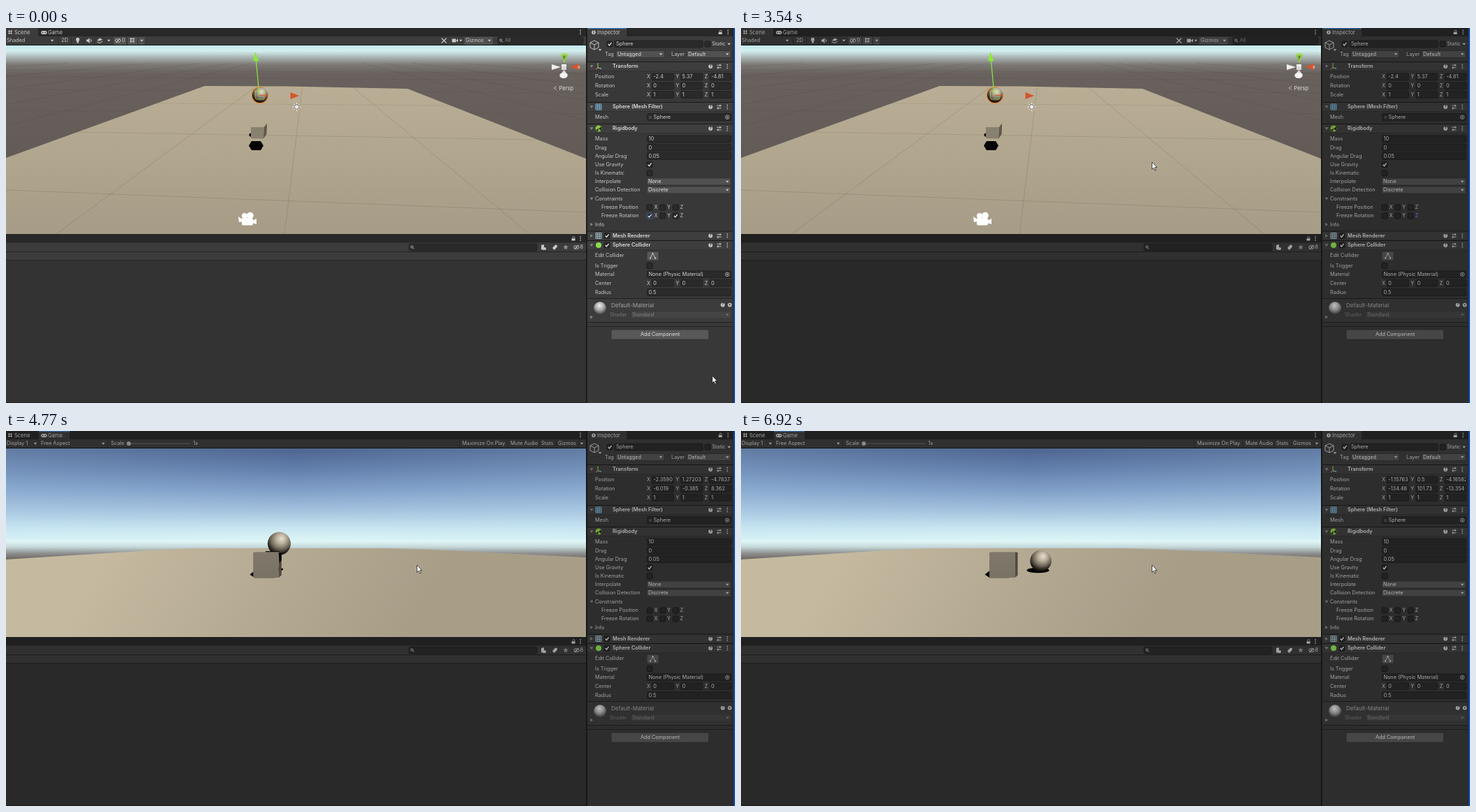
An HTML page with a canvas that plays this animation: 1042x537 px, repeating every 7 s.

```html
<!DOCTYPE html>
<html lang="en">
<head>
<meta charset="utf-8">
<title>Physics sandbox</title>
<style>
html, body { margin: 0; width: 100%; height: 100%; overflow: hidden; background: #333; }
canvas { display: block; }
</style>
</head>
<body>
<canvas id="stage" width="1042" height="537"></canvas>
<script>
const c = document.getElementById('stage').getContext('2d');
const LOOP = 7, STEP = 0.07692;
const PLAY = 2.23, GAME = 3.92, MOVE = 4.22, HIT = 4.769;
const FALL_START = HIT - Math.sqrt(4.09797 / 4.905);
const TEXT = '#c8c8c8', FIELD = '#2a2a2a', EDGE = '#191919', BLUE = '#3a79bb';

// ---------- helpers ----------
function rect(x, y, w, h, fill) { c.fillStyle = fill; c.fillRect(x, y, w, h); }

function box(x, y, w, h, fill, stroke, r = 1.5) {
  c.beginPath(); c.roundRect(x, y, w, h, r);
  c.fillStyle = fill; c.fill();
  if (stroke) { c.strokeStyle = stroke; c.lineWidth = 0.8; c.stroke(); }
}

function poly(points, fill) {
  c.beginPath();
  points.forEach(([x, y]) => c.lineTo(x, y));
  c.closePath(); c.fillStyle = fill; c.fill();
}

function line(points, color = TEXT, width = 1) {
  c.beginPath();
  points.forEach(([x, y]) => c.lineTo(x, y));
  c.strokeStyle = color; c.lineWidth = width; c.stroke();
}

function oval(x, y, rx, ry, fill) {
  c.beginPath(); c.ellipse(x, y, rx, ry, 0, 0, Math.PI * 2);
  c.fillStyle = fill; c.fill();
}

function ring(x, y, r, color = TEXT, width = 0.8) {
  c.beginPath(); c.arc(x, y, r, 0, Math.PI * 2);
  c.strokeStyle = color; c.lineWidth = width; c.stroke();
}

function text(s, x, y, { color = TEXT, size = 7.3, weight = 400, align = 'left' } = {}) {
  c.font = `${weight} ${size}px Inter, sans-serif`;
  c.textAlign = align; c.textBaseline = 'middle';
  c.fillStyle = color; c.fillText(s, x, y + 0.3);
}

function vertical(y0, y1, stops) {
  const g = c.createLinearGradient(0, y0, 0, y1);
  stops.forEach(([y, color]) => g.addColorStop((y - y0) / (y1 - y0), color));
  return g;
}

function ball(x, y, r, lift) {
  const g = c.createRadialGradient(x + r * .22, y - r * .45 - lift, 0, x + r * .1, y - r * .35 - lift, r * 1.4);
  g.addColorStop(0, '#e6dfd0'); g.addColorStop(.3, '#bab09c');
  g.addColorStop(.6, '#746c5d'); g.addColorStop(.85, '#221f1a'); g.addColorStop(1, '#050505');
  oval(x, y, r, r, g);
}

// Piecewise linear track: rows of [time, ...values]
function track(rows, t) {
  if (t <= rows[0][0]) return rows[0].slice(1);
  for (let i = 1; i < rows.length; i++) {
    const a = rows[i - 1], b = rows[i];
    if (t <= b[0]) return b.slice(1).map((v, j) => a[j + 1] + (v - a[j + 1]) * (t - a[0]) / (b[0] - a[0]));
  }
  return rows[rows.length - 1].slice(1);
}

// ---------- small interface parts ----------
const caret = (x, y, color = TEXT) => poly([[x - 2.3, y - 1.2], [x + 2.3, y - 1.2], [x, y + 1.5]], color);

function fold(x, y, open) {
  poly(open ? [[x - 2.5, y - 1.8], [x + 2.5, y - 1.8], [x, y + 2]]
            : [[x - 1.8, y - 2.5], [x + 2, y], [x - 1.8, y + 2.5]], '#858585');
}

function dots(x, y) { for (let i = -1; i < 2; i++) oval(x, y + i * 2.6, .8, .8, TEXT); }

function lock(x, y) {
  rect(x - 2.5, y - .3, 5, 3.3, TEXT);
  c.beginPath(); c.arc(x + .4, y - 1, 1.7, Math.PI, 0);
  c.strokeStyle = TEXT; c.lineWidth = .8; c.stroke();
}

function check(x, y, on, focus) {
  box(x - 4, y - 4, 8, 8, FIELD, focus ? BLUE : '#171717');
  if (on) line([[x - 2.3, y], [x - .6, y + 2], [x + 2.6, y - 2.2]], '#e0e0e0', 1.3);
}

function field(x, y, w, s) {
  box(x, y - 5, w, 10, FIELD, '#202020');
  c.save(); c.beginPath(); c.rect(x, y - 5, w - 1, 10); c.clip();
  text(s, x + 2, y, { color: '#d2d2d2' });
  c.restore();
}

function dropdown(x, y, w, s, dim) {
  box(x, y - 5, w, 10, dim ? '#444' : '#515151', dim ? '#3a3a3a' : '#303030');
  text(s, x + 2, y, { color: dim ? '#858585' : '#e0e0e0' });
  caret(x + w - 5, y, dim ? '#777' : TEXT);
}

function search(x, y, w) {
  box(x, y - 5, w, 10, FIELD, '#202020', 2);
  ring(x + 4.2, y - .6, 1.6); line([[x + 5.4, y + .6], [x + 7, y + 2.3]]);
}

function eye(x, y) {
  c.beginPath(); c.ellipse(x, y, 3.8, 2.4, 0, 0, 7);
  c.strokeStyle = TEXT; c.lineWidth = .9; c.stroke();
  oval(x, y, 1.1, 1.1, TEXT); line([[x - 3, y + 3], [x + 3, y - 3]]);
}

function gridIcon(x, y, color) {
  for (let i = -4; i <= 4; i += 2.66) {
    line([[x + i, y - 4], [x + i, y + 4]], color, .9);
    line([[x - 4, y + i], [x + 4, y + i]], color, .9);
  }
}

function help(x, y) {
  oval(x, y, 2.9, 2.9, TEXT);
  text('?', x, y, { size: 5.5, weight: 700, color: '#333', align: 'center' });
}

function header(y, title, open, toggled) {
  rect(831, y - 6.5, 208, 13, '#3e3e3e');
  rect(831, y - 7, 208, 1, '#1c1c1c');
  rect(831, y + 6, 208, .8, '#303030');
  fold(837, y, open);
  if (toggled) check(859, y, true);
  text(title, 867, y, { weight: 600, color: '#dcdcdc' });
  help(1007, y);
  for (const [dy, k] of [[-1.8, 1], [1.8, -1]]) {
    line([[1016, y + dy], [1022.5, y + dy]], TEXT, .9);
    rect(1018.6 + k * 1.5, y + dy - 1.5, 1.2, 3, TEXT);
  }
  dots(1031, y);
}

function vector(label, y, values) {
  text(label, 842, y);
  ['X', 'Y', 'Z'].forEach((axis, i) => {
    const x = 916 + i * 41.3;
    text(axis, x, y);
    field(x + 7.3, y, 31, values[i]);
  });
}

function axes(label, y, on, focusX, focusZ) {
  text(label, 851, y);
  ['X', 'Y', 'Z'].forEach((axis, i) => {
    const x = 920 + i * 18.6;
    check(x, y, on[i], i === 0 && focusX);
    text(axis, x + 6.4, y, { color: i === 2 && focusZ ? '#5b98e8' : TEXT });
  });
}

// ---------- panels ----------
function tabs(game) {
  rect(0, 0, 829, 12, '#282828');
  rect(game ? 47 : 0, 0, game ? 44 : 46, 12, '#3c3c3c');
  if (game) rect(47, 0, 44, 1.3, BLUE);
  for (const d of [-1.5, 1.5]) {
    line([[3, 6 + d], [9, 6 + d]], TEXT, .9);
    line([[6 + d, 3], [6 + d, 9]], TEXT, .9);
  }
  text('Scene', 12, 6.3, { size: 7.5 });
  box(50, 4, 8.5, 5, TEXT, null, 2.5);
  oval(52.4, 6.4, .9, .9, '#333'); oval(56, 6.4, .9, .9, '#333');
  text('Game', 60, 6.3, { size: 7.5 });
  dots(821, 6);
  rect(0, 12, 829, 12.5, '#3c3c3c');
  rect(0, 24, 829, 1, EDGE);
}

function sceneBar() {
  text('Shaded', 1, 18); caret(66, 18);
  for (const x of [74, 93, 110, 126]) rect(x, 13, 1, 11, '#303030');
  text('2D', 79, 18);
  oval(102.5, 16.5, 2.5, 2.7, TEXT); rect(101.3, 19, 2.5, 2.5, TEXT);
  poly([[115, 16.5], [117, 16.5], [119.5, 14], [119.5, 22], [117, 19.5], [115, 19.5]], TEXT);
  line([[121, 16], [122, 18], [121, 20]]);
  poly([[130, 18], [134, 14.5], [138, 16.5], [134, 18.5]], TEXT);
  line([[130, 20], [134, 21.5], [138, 19]]); caret(147, 18);
  rect(154, 13, 18, 11, '#515151'); eye(160, 18); text('0', 165.5, 18);
  rect(174, 13, 24, 11, '#515151'); rect(188, 13, 1, 11, '#303030');
  line([[177, 15.5], [184, 15.5]]); line([[177, 19], [184, 19]]);
  line([[178.5, 14], [178.5, 21.5]]); line([[182, 14], [182, 21.5]]); caret(194, 18);
  line([[622.5, 14.5], [629.5, 21.5]], TEXT, 1.3); line([[629.5, 14.5], [622.5, 21.5]], TEXT, 1.3);
  rect(637.5, 15.5, 5.5, 5, TEXT); poly([[643, 18], [646, 15.5], [646, 20.5]], TEXT); caret(650, 18);
  rect(655, 13, 41, 11, '#515151'); text('Gizmos', 657, 18); caret(691, 18);
  search(703, 18, 122); text('All', 713, 18, { color: '#858585' });
}

function gameBar() {
  text('Display 1', 1, 18); caret(42, 18);
  text('Free Aspect', 50, 18); caret(139, 18);
  text('Scale', 150, 18);
  rect(173, 17.5, 90, 1, '#666'); oval(175.5, 18, 3, 3, '#aaa');
  text('1x', 267.5, 18);
  text('Maximize On Play', 652, 18); text('Mute Audio', 721, 18);
  text('Stats', 765, 18); text('Gizmos', 789, 18); caret(823, 18);
  for (const x of [46, 145, 648, 717, 762, 786, 818]) rect(x, 13, 1, 11, '#303030');
}

function lowerPanel() {
  rect(0, 295, 829, 242, '#333');
  rect(0, 295, 829, 12.5, '#282828');
  rect(0, 307.5, 829, 25, '#3c3c3c');
  rect(0, 320, 829, 1, '#242424'); rect(0, 332, 829, 1, '#242424');
  lock(811, 301.5); dots(821, 301.5);
  search(576, 314, 183);
  poly([[765, 311], [769, 310], [769, 318], [765, 317]], TEXT); oval(770, 316, 2, 2, TEXT);
  poly([[781, 315], [785, 310.5], [788, 311], [787.5, 314], [783.5, 318]], TEXT);
  poly(Array.from({ length: 10 }, (_, i) => {
    const a = i * Math.PI / 5 - Math.PI / 2, r = i % 2 ? 1.7 : 4;
    return [800 + r * Math.cos(a), 314 + r * Math.sin(a)];
  }), '#929292');
  eye(815.5, 314); text('8', 820.5, 314);
  rect(0, 536, 829, 1, '#222');
}

function inspector(t) {
  const xOff = t >= .98, zOff = t >= 1.45;
  rect(829, 0, 213, 537, '#383838');
  rect(829, 0, 1.7, 537, EDGE);
  rect(831, 0, 208, 12, '#282828');
  rect(831, 0, 56, 12, '#3c3c3c');
  if (t < GAME) rect(831, 0, 56, 1.3, BLUE);
  oval(840, 6.2, 2.8, 2.8, TEXT); rect(839.5, 4.5, 1, 3.5, '#333');
  text('Inspector', 845, 6.3, { size: 7.4 });
  lock(1021, 6); dots(1032, 6);

  rect(831, 12, 208, 36, '#3c3c3c');
  line([[841, 18], [847, 21], [847, 28], [841, 31], [835, 28], [835, 21], [841, 18]], '#d0d0d0', .9);
  line([[835, 21], [841, 24], [847, 21]], '#d0d0d0', .9); line([[841, 24], [841, 31]], '#d0d0d0', .9);
  caret(849, 31.5);
  check(863, 23, true); field(870, 23, 126, 'Sphere');
  check(1003, 23, false); text('Static', 1009, 23); caret(1033.5, 23);
  text('Tag', 856, 37.5); dropdown(872, 37.5, 69, 'Untagged');
  text('Layer', 951, 37.5); dropdown(973, 37.5, 63, 'Default');

  header(55, 'Transform', true);
  line([[846, 50], [846, 57], [851, 58]], '#8bc83f', 1.1);
  line([[846, 57], [843, 59]], '#e0633a', 1.3); line([[846, 57], [851, 58]], '#6fb5e8', 1.1);
  const pose = readout(t);
  vector('Position', 70, pose.position);
  vector('Rotation', 83, pose.rotation);
  vector('Scale', 95.5, ['1', '1', '1']);

  header(113, 'Sphere (Mesh Filter)', true); gridIcon(847, 113, '#7fc0e8');
  text('Mesh', 842, 127.7); field(916.5, 127.7, 120, '');
  rect(919, 126, 4, 4, '#484848'); text('Sphere', 925.5, 127.7, { color: '#d2d2d2' });
  ring(1031, 127.7, 2.7); oval(1031, 127.7, 1, 1, TEXT);

  header(144, 'Rigidbody', true);
  oval(847, 144, 4.5, 4.5, '#8bc83f');
  poly([[847, 144], [851, 141.5], [851, 147]], '#222'); poly([[847, 144], [843, 146], [846, 148.3]], '#222');
  [['Mass', '10'], ['Drag', '0'], ['Angular Drag', '0.05']].forEach(([label, v], i) => {
    const y = 159 + i * 12.2;
    text(label, 842, y); field(916.5, y, 120, v);
  });
  text('Use Gravity', 842, 195.6); check(920, 195.6, true);
  text('Is Kinematic', 842, 207.8); check(920, 207.8, false);
  text('Interpolate', 842, 220); dropdown(916, 220, 120, 'None');
  text('Collision Detection', 842, 232); dropdown(916, 232, 120, 'Discrete');
  fold(837, 244.5, true); text('Constraints', 842, 244.5);
  axes('Freeze Position', 257, [0, 0, 0]);
  axes('Freeze Rotation', 269, [!xOff, false, !zOff], !zOff, zOff && t < GAME);
  fold(837, 281.3, false); text('Info', 842, 281.3);

  header(297.5, 'Mesh Renderer', false, true); gridIcon(847, 297.5, '#a8c4d4');
  header(311, 'Sphere Collider', true, true); oval(847, 311, 4, 4, '#8bdc4f');
  text('Edit Collider', 842, 326);
  box(916, 320, 17, 13, '#585858', '#303030');
  line([[921, 329.5], [924.5, 323], [928, 329.5]], TEXT, .8);
  for (const [x, y] of [[921, 329.5], [924.5, 323], [928, 329.5]]) rect(x - 1, y - 1, 2, 2, TEXT);
  text('Is Trigger', 842, 340.5); check(920, 340.5, false);
  text('Material', 842, 352.8); field(916.5, 352.8, 120, 'None (Physic Material)');
  ring(1031, 352.8, 2.7); oval(1031, 352.8, 1, 1, TEXT);
  vector('Center', 365.3, ['0', '0', '0']);
  text('Radius', 842, 378.5); field(916.5, 378.5, 120, '0.5');

  rect(831, 387, 208, 34, '#3c3c3c'); rect(831, 387, 208, 1, '#222');
  const g = c.createRadialGradient(848, 397, 0, 849, 399, 12);
  g.addColorStop(0, '#f0f0f0'); g.addColorStop(.5, '#aaa'); g.addColorStop(1, '#333');
  oval(849, 401, 9, 9, g);
  text('Default-Material', 865, 397, { size: 8, color: '#a4a4a4' });
  text('Shader', 863, 411, { color: '#747474' }); dropdown(893, 410.7, 143, 'Standard', true);
  fold(837, 414, false); help(1024.5, 396.5);
  ring(1034.5, 396.5, 2, TEXT, 1.7);
  rect(831, 421, 208, 1, '#222'); rect(831, 427, 208, 1, '#242424');
  box(865, 432, 139.5, 14, '#585858', '#303030');
  text('Add Component', 935, 439, { align: 'center', color: '#e4e4e4' });
}

// ---------- motion ----------
function height(t) {
  if (t < MOVE) return 5.37;
  if (t <= HIT) return 5.37 - 4.905 * (t - FALL_START) ** 2;
  const u = t - HIT;
  return u > .8565 ? .5 : 1.27203 + 3.3 * u - 4.905 * u * u;
}

function readout(t) {
  const [x, z] = track([[4.15, -2.4, -4.81], [HIT, -2.35904, -4.78374], [5.461, -1.8183, -4.44604], [6.92, -1.15763, -4.16582]], t);
  const turn = track([[4.6, 0, 0, 0], [HIT, -6.017, -.381, 8.355], [5.461, -39.254, -70.555, 133.324], [6.92, -134.46, 101.73, -13.354]], t);
  const y = height(t - Math.max(0, Math.min(.1835, t - HIT)));
  return {
    position: [x, y, z].map(v => String(+v.toFixed(5))),
    rotation: turn.map(v => String(+v.toFixed(3)))
  };
}

// ---------- views ----------
function clipView(draw) {
  c.save(); c.beginPath(); c.rect(0, 25, 829, 270); c.clip(); draw(); c.restore();
}

function sceneView() {
  rect(0, 25, 829, 270, vertical(25, 295, [[25, '#c4eaef'], [33, '#d3eeee'], [42, '#a9b4b3'], [53, '#7b7773'], [66, '#69615d'], [295, '#5d5550']]));
  const ray = (slope, color, from = 50) => line([[430 + slope * (from - 30), from], [430 + slope * 265, 295]], color, .8);
  for (const s of [3.9, 5.4, 7.5, 11, 17]) { ray(s, 'rgba(0,0,0,.1)'); ray(-s, 'rgba(0,0,0,.1)'); }
  for (const y of [60, 70, 88, 118]) line([[0, y], [829, y + 5]], 'rgba(0,0,0,.08)', .8);
  poly([[284, 83], [400, 83.5], [574, 87], [829, 187], [829, 295], [0, 295], [0, 186]],
    vertical(83, 295, [[83, '#b9ae95'], [180, '#b1a68e'], [295, '#a69c87']]));
  for (const s of [-1.35, -.12, 1.2]) ray(s, 'rgba(60,50,35,.2)', 85);
  line([[215, 108], [634, 111]], 'rgba(60,50,35,.13)', .8);
  line([[100, 149], [760, 160]], 'rgba(60,50,35,.16)', .8);
  line([[0, 232], [829, 264]], 'rgba(60,50,35,.2)', .8);

  poly([[347, 168.5], [351, 162], [364, 162], [368, 168.5], [364, 175], [351, 175]], '#050505');
  oval(350.5, 153, 3, 2.6, '#050505');
  poly([[350, 142], [369, 142], [368, 158.5], [350, 158]], '#89816f');
  poly([[369, 142], [373, 136.5], [372.5, 152], [368, 158.5]], '#5e574a');

  oval(363, 96, 12, 12, '#f47a20');
  ball(363, 96, 11, 0);
  line([[362, 96], [357.5, 47]], '#8be93c', 1.2);
  poly([[353, 47], [361.5, 47.5], [356.5, 34]], '#8be93c');
  line([[356, 90], [369, 90], [369, 102], [357, 102], [356, 90]], 'rgba(190,220,90,.75)', .9);
  line([[362, 96], [374, 97]], '#d4552b', 1);
  poly([[366, 86], [375, 85], [374, 94]], 'rgba(150,200,235,.35)');
  poly([[406.5, 92], [419, 97], [406.5, 102]], '#d4552b');

  for (let i = 0; i < 8; i++) {
    const a = i * Math.PI / 4, x = Math.cos(a), y = Math.sin(a);
    line([[415.5 + 4.2 * x, 113 + 4.2 * y], [415.5 + 6 * x, 113 + 6 * y]], '#fff', 1);
  }
  oval(415.5, 113, 3, 3, '#eee'); ring(415.5, 113, 3, '#777', .7);

  oval(341, 269, 4, 4, '#fff'); oval(349, 268.5, 4.8, 4.8, '#fff');
  box(337, 272, 16, 10.5, '#fff', null, 2);
  poly([[332, 270], [338, 274], [338, 277], [333, 278]], '#fff');
  poly([[352, 276], [358, 273], [358, 281], [352, 279]], '#fff');

  poly([[780, 52], [793, 56], [780, 60]], '#eef0f0');
  poly([[819, 51], [806, 55.5], [819, 60]], '#d4552b');
  poly([[793, 38], [803, 38], [798, 51]], '#8bc83f'); oval(798, 38, 5, 2, '#a3dd58');
  poly([[792, 67], [803, 67], [797.5, 60]], '#d8dada'); oval(797, 68, 5.7, 4, '#f4f4f4');
  rect(794, 52, 7, 8, '#d7d7d7'); rect(794, 52, 7, 2.5, '#fafafa');
  text('y', 798, 41, { size: 7, color: '#333', align: 'center' });
  text('x', 819, 56, { size: 7, color: '#eee', align: 'center' });
  line([[787, 83.5], [783, 86], [787, 88.5]], '#ccc', .8);
  text('Persp', 790.5, 86, { size: 7.6, color: '#e0e0e0' });
}

function gameView(t) {
  rect(0, 25, 829, 270, vertical(25, 295, [[25, '#4d6590'], [55, '#627fac'], [85, '#809fc8'], [115, '#a5c3de'], [140, '#cae7f1'], [158, '#def5f6'], [166, '#c6d8d9'], [175, '#8f9190'], [184, '#6b6460'], [295, '#605853']]));
  const edge = c.createLinearGradient(0, 0, 829, 0);
  edge.addColorStop(0, 'rgba(190,225,245,.18)'); edge.addColorStop(.5, 'rgba(190,225,245,0)'); edge.addColorStop(1, 'rgba(190,225,245,.18)');
  rect(0, 25, 829, 130, edge);
  const sand = c.createLinearGradient(150, 165, 520, 380);
  sand.addColorStop(0, '#c5baa0'); sand.addColorStop(.5, '#b5aa93'); sand.addColorStop(1, '#a89e88');
  poly([[0, 184], [230, 169.5], [275, 168], [545, 168], [600, 169.5], [829, 181], [829, 295], [0, 295]], sand);

  const y = height(t), lift = y - .5;
  const [bx, r] = track([[MOVE, 388, 16.7], [HIT, 390.5, 16.5], [5.461, 411, 15.6], [5.63, 416, 15.4], [6.92, 428.5, 15.2]], t);
  const by = 170 - (y - 1) * 32.1;
  const drop = t < MOVE ? 0 : Math.min(1, 36 * 4.905 * (t - FALL_START) ** 2 / 75);
  const [cx] = track([[MOVE, 356], [4.6, 355], [HIT, 353.3], [5, 355]], t);
  const cy = 99 + 75 * drop;

  const sx = 356 + 12.5 * drop, sy = 197.5 + 8 * drop, h = 3.5 + 1.2 * drop;
  poly([[sx - 20, sy], [sx - 14, sy - h], [sx + 15, sy - h], [sx + 20, sy], [sx + 15, sy + h], [sx - 13, sy + h]], '#020202');
  oval(bx - 4 - lift * 7.4, 199.5 - lift * 2.05, 16 - lift * .9, 3.8 - lift * .37, '#020202');
  ball(bx, by, r, Math.max(0, y - 1.3) * 5);

  const away = v => v + (168 - v) * .085;
  const right = cx + 36.5, back = cx + 40.5, low = cy + 36;
  poly([[right, cy], [back, away(cy)], [back, away(low)], [right, low]], '#504a3f');
  if (low < 168) poly([[cx, low], [right, low], [back, away(low)], [cx + 6, away(low)]], '#020202');
  if (cy > 168) poly([[cx, cy], [right, cy], [back, away(cy) - .6], [cx + 4, away(cy) - .6]], '#8f8674');
  rect(cx, cy, 36.5, 36, vertical(cy, low, [[cy, '#80786a'], [low, '#797264']]));
  if (Math.abs(t - HIT) < .25) {
    rect(371, cy - 2, 20, 1.3, '#111');
    poly([[right, cy], [back, cy], [back, cy + 11], [right + 1, cy + 15]], '#050505');
  }
}

const CURSOR = [
  [.05, 1009, 498], [.3, 900, 300], [.46, 863, 191], [.62, 905, 255], [.76, 917, 270], [.99, 918, 268],
  [1.153, 942, 268], [1.4, 957, 268], [1.69, 957, 267], [1.85, 518, 8], [1.92, 440, -20], [2.4, 424, -20],
  [2.53, 424.5, -9], [2.6, 424, -20], [2.93, 425, -20], [3, 427, 0], [3.31, 587, 192]
];

function cursor(t) {
  const [x, y] = track(CURSOR, t);
  c.save(); c.translate(x, y);
  const arrow = [[.5, 0], [.5, 10.3], [2.8, 8.2], [4.5, 12], [6.1, 11.3], [4.5, 7.6], [7.6, 7.6]];
  poly(arrow, '#fff'); line([...arrow, arrow[0]], '#111', .7);
  c.restore();
}

function draw(t) {
  const game = t >= GAME - .01;
  tabs(game);
  (game ? gameBar : sceneBar)();
  lowerPanel();
  inspector(t);
  if (t >= PLAY) rect(0, 0, 1042, 537, 'rgba(0,0,0,.2)');
  clipView(() => game ? gameView(t) : sceneView());
  rect(1039, 0, 1, 537, '#20252c');
  rect(1040, 0, 2, 537, '#1450b4');
  cursor(t);
}

const start = performance.now();
let shown = -1;
function tick() {
  const t = (performance.now() - start) / 1000 % LOOP;
  const step = Math.min(90, Math.floor((t + .008) / STEP));
  if (step !== shown) draw((shown = step) * STEP);
  requestAnimationFrame(tick);
}
tick();
</script>
</body>
</html>
```
